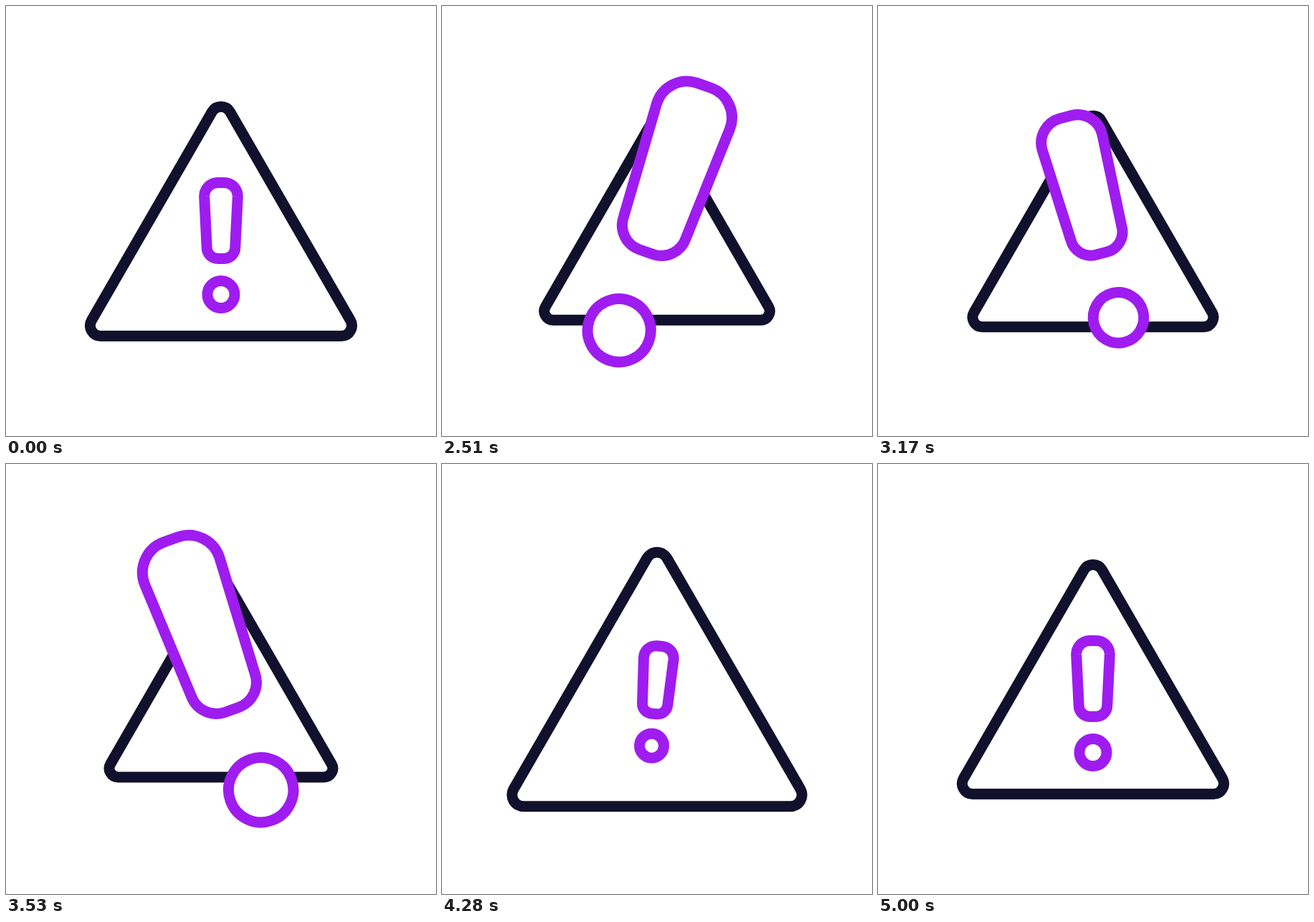
Recreate the animation shown at these times as an HTML page. Size 600 by 600 pixels, loop 5.06 s.

```html
<!DOCTYPE html>
<html lang="en">
<head>
<meta charset="utf-8">
<title>Warning</title>
<style>
  html, body { margin: 0; width: 100%; height: 100%; overflow: hidden; background: #fff; }
  svg { display: block; width: 100%; height: 100%; }
  path, circle { fill: #fff; stroke-width: 15; vector-effect: non-scaling-stroke; }
  #triangle { stroke: #11112d; }
  #mark { stroke: #9f1cf0; }
</style>
</head>
<body>
<svg viewBox="0 0 600 600">
  <g id="triangle">
    <path d="M-12.6 -152.2 A14.6 14.6 0 0 1 12.6 -152.2 L180.5 138.6
             A14.6 14.6 0 0 1 167.9 160.5 H-167.9 A14.6 14.6 0 0 1 -180.5 138.6 Z"/>
  </g>
  <g id="mark">
    <path d="M-4.5 -53.5 H4.5 A19 19 0 0 1 23.3 -34 L19.8 37 A15.5 15.5 0 0 1 4.5 52.5
             H-4.5 A15.5 15.5 0 0 1 -19.8 37 L-23.3 -34 A19 19 0 0 1 -4.5 -53.5 Z"/>
    <circle cy="102.5" r="19"/>
  </g>
</svg>
<script>
const LOOP = 5060, START = 2030, STEP = 30;
const triangle = document.getElementById('triangle');
const mark = document.getElementById('mark');

const smooth = u => u * u * (3 - 2 * u);

// cubic-bezier(.3, 0, .3, 1)
function quick(x) {
  let lo = 0, hi = 1;
  for (let i = 0; i < 24; i++) {
    const u = (lo + hi) / 2;
    if (0.9 * u * (1 - u) + u ** 3 < x) lo = u; else hi = u;
  }
  return smooth(lo);
}

// Each key: time, value, easing used on the way to it
const tracks = {
  size: [[1995, 1], [2420, 0.853], [3030, 0.945, quick], [3610, 0.853, quick],
         [3750, 0.853], [4195, 1.12], [4670, 0.98], [5000, 1]],
  zoom: [[1995, 1], [2420, 2.39], [3030, 1.66, quick], [3610, 2.39, quick],
         [4190, 0.88], [4640, 1.02], [5000, 1]],
  lift: [[1995, 0], [2420, 80], [3030, 40, quick], [3610, 80, quick],
         [4190, -2], [4640, 0]],
  tilt: [[1995, 0], [2420, 20], [3630, -20, quick], [4265, 4.6], [4680, -0.8], [5000, 0]]
};

function valueAt(keys, t) {
  if (t <= keys[0][0]) return keys[0][1];
  for (let i = 1; i < keys.length; i++) {
    const [t0, from] = keys[i - 1];
    const [t1, to, ease = smooth] = keys[i];
    if (t < t1) return from + (to - from) * ease((t - t0) / (t1 - t0));
  }
  return keys[keys.length - 1][1];
}

function draw(ms) {
  const time = ms % LOOP;
  const t = time < START ? 0 : START + Math.floor((time - START) / STEP) * STEP;
  const at = name => valueAt(tracks[name], t);
  triangle.setAttribute('transform', `translate(300 300) scale(${at('size')})`);
  mark.setAttribute('transform',
    `translate(300 300) rotate(${at('tilt')}) translate(0 ${-at('lift')}) scale(${at('zoom')})`);
}

const begin = performance.now();
function tick() {
  draw(performance.now() - begin);
  requestAnimationFrame(tick);
}
tick();
</script>
</body>
</html>
```
